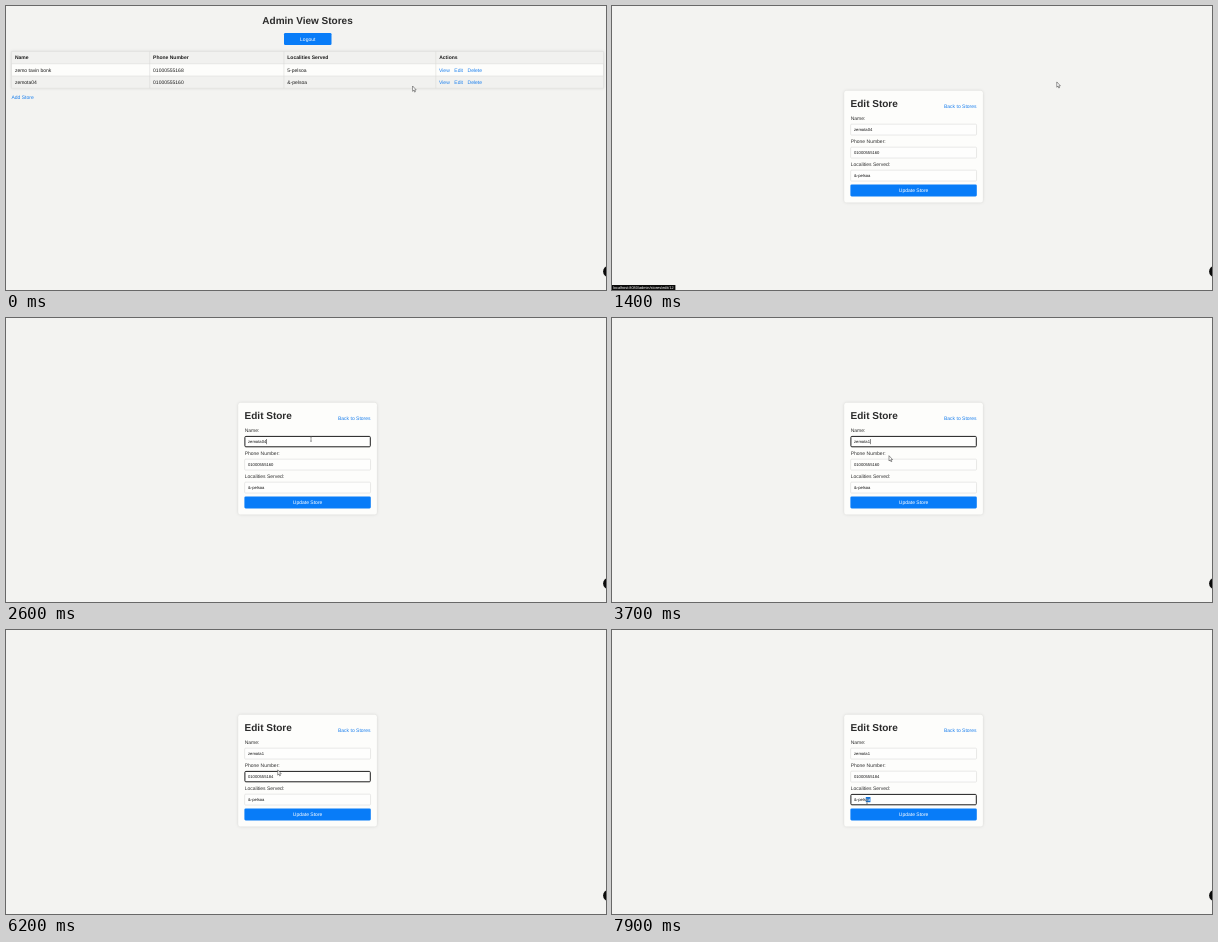
Animation of 600x284 px, one loop 8 s. Source, as an HTML page:

```html
<!DOCTYPE html>
<html lang="en">
<head>
<meta charset="utf-8">
<title>Admin stores</title>
<style>
  html, body { margin: 0; width: 100%; height: 100%; overflow: hidden; background: #f3f3f1; }
  svg { display: block; width: 600px; height: 284px; }
  text { font: 5px "Liberation Sans", Arial, sans-serif; fill: #333; text-rendering: geometricPrecision; white-space: pre; }
  .bold { font-weight: bold; fill: #1c1c1c; }
  .title { font-size: 10px; font-weight: bold; fill: #2b2b2b; }
  .link { fill: #1a7fee; }
  .cell { fill: #1c1c1c; }
  .value { font-size: 4.167px; fill: #111; }
  .white { fill: #fff; }
  .status { font-size: 3.87px; fill: #fff; }
  .mid { text-anchor: middle; }
  .hover { text-decoration: underline; }
  .card { filter: drop-shadow(0 0 1.5px rgba(0, 0, 0, .13)); }
  .arrow, .hand { fill: #fff; stroke: #333; stroke-width: .5; }
  .beam { fill: none; stroke: #555; stroke-width: .55; }
</style>
</head>
<body>
<svg id="stage" viewBox="0 0 600 284"></svg>
<script>
const stage = document.getElementById('stage');
const LOOP = 8000, STEP = 100, MOVE = 500;
const FORM = { x: 238.4, w: 126.4, top: 117.9, gap: 23, h: 11.4 };
const VALUE = 4.167, STATUS = 3.87;

const pen = document.createElement('canvas').getContext('2d');
pen.font = '100px "Liberation Sans", Arial, sans-serif';
const widthOf = (s, size) => pen.measureText(s).width * size / 100;

const rect = (x, y, w, h, fill, extra = '') =>
  `<rect x="${x}" y="${y}" width="${w}" height="${h}" fill="${fill}" ${extra}/>`;
const text = (x, y, s, cls = '') =>
  `<text x="${x}" y="${y}" class="${cls}">${s.replace(/&/g, '&amp;')}</text>`;
const button = (x, y, w, label, over) =>
  rect(x, y, w, 12, over ? '#0a57ad' : '#087cf8', 'rx="1.3"') + text(x + w / 2, y + 7.7, label, 'white mid');

// How many of `max` repeated actions have happened by time t
const count = (t, start, gap, max) =>
  Math.max(0, Math.min(max, Math.floor((t - start) / gap) + 1));

// Pointer stops: arrival time, x, y
const STOPS = [
  [0, 406.6, 80.3], [500, 468, 76], [900, 453, 76.6], [1800, 374, 73], [2400, 305, 121],
  [3400, 277, 138], [4200, 264, 162], [5000, 264.5, 148], [5600, 278.5, 162.5],
  [6400, 268, 128], [7100, 290.5, 178.8], [7500, 260, 171], [7900, 255, 172]
];

// The pointer rests at a stop, then glides to the next one in at most MOVE ms
function pointerAt(t) {
  const i = STOPS.findIndex(s => s[0] > t);
  if (i < 0) return STOPS.at(-1).slice(1);
  const [t0, x0, y0] = STOPS[i - 1], [t1, x1, y1] = STOPS[i];
  const k = Math.max(0, 1 - (t1 - t) / Math.min(MOVE, t1 - t0));
  const e = k * k * (3 - 2 * k);
  return [x0 + (x1 - x0) * e, y0 + (y1 - y0) * e];
}

const SHAPES = {
  arrow: 'M0-.3V5L1.2 3.9 2 5.8 2.8 5.4 2 3.6H3.6Z',
  hand: 'M-.6 .5Q0-.5 .6 .5V3L3 3.5Q3.7 3.8 3.5 4.6L2.8 7.4H-.6L-2.5 4.6Q-2.3 3.7-.6 4.6Z',
  beam: 'M-1-2.2H1M0-2.2V2.2M-1 2.2H1'
};

const COLS = [5.5, 143.7, 277.9, 429.8];
const ROWS = [
  ['Name', 'Phone Number', 'Localities Served', 'Actions'],
  ['zemo tavin bonk', '01000555168', '5-pelsoa'],
  ['zemota04', '01000555160', '&-pelsoa']
];

let linkX = 433;
const LINKS = ['View', 'Edit', 'Delete'].map(label => {
  const x = linkX, w = widthOf(label, 5);
  linkX += w + 4.6;
  return { label, x, w };
});
const linkUnder = (x, y) => y > 73 && y < 79 ? LINKS.find(l => x >= l.x && x <= l.x + l.w) : null;

function storeList(over) {
  const [left, w, top, rowH] = [5.5, 592, 45.5, 12.25];
  const h = rowH * ROWS.length;
  let s = text(301.5, 18.4, 'Admin View Stores', 'title mid') + button(278, 27, 47.5, 'Logout');
  s += `<g class="card">${rect(left, top, w, h, '#fdfdfb')}</g>`;
  let grid = `M${left + w} ${top}v${h}M${left} ${top + h}h${w}`;
  for (const x of COLS) grid += `M${x} ${top}v${h}`;
  ROWS.forEach((row, r) => {
    const y = top + r * rowH;
    if (r !== 1) s += rect(left, y, w, rowH, '#f1f1ef');
    grid += `M${left} ${y}h${w}`;
    row.forEach((v, c) => s += text(COLS[c] + 3.4, y + 7.8, v, r ? 'cell' : 'bold'));
    if (r) for (const l of LINKS)
      s += text(l.x, y + 7.8, l.label, r === 2 && l === over ? 'link hover' : 'link');
  });
  s += `<path d="${grid}" fill="none" stroke="#d6d6d4" stroke-width=".5"/>`;
  return s + text(left, 93.2, 'Add Store', 'link');
}

function field({ label, value, focus, selected = 0, caret }, row) {
  const y = FORM.top + row * FORM.gap;
  const head = value.slice(0, value.length - selected), tail = value.slice(head.length);
  const from = 242 + widthOf(head, VALUE), end = 242 + widthOf(value, VALUE);
  const inset = focus ? .5 : .25;
  let s = text(238.7, y - 3.9, label);
  s += rect(FORM.x + inset, y + inset, FORM.w - 2 * inset, FORM.h - 2 * inset, '#fefefd',
    `rx="1" stroke="${focus ? '#1c1c1c' : '#d2d2d0'}" stroke-width="${2 * inset}"`);
  if (selected) s += rect(from, y + 3.1, end - from, 5.2, '#1470d0');
  s += text(242, y + 7.2, head, 'value') + text(from, y + 7.2, tail, 'value white');
  return caret ? s + rect(end, y + 3.1, .5, 5.2, '#111') : s;
}

function editForm(t, over) {
  const name = 'zemota04'.slice(0, 8 - count(t, 2900, 200, 2)) + (t < 3500 ? '' : '1');
  const phone = '010005551' + (t < 5400 ? '60' : '84'.slice(0, count(t, 5400, 100, 2)));
  const onName = t >= 2600 && t < 4400;
  const fields = [
    { label: 'Name:', value: name, focus: onName, caret: onName },
    { label: 'Phone Number:', value: phone, focus: t >= 4400 && t < 7500,
      selected: t < 5400 ? count(t, 4700, 300, 2) : 0 },
    { label: 'Localities Served:', value: '&-pelsoa', focus: t >= 7500,
      selected: count(t, 7700, 100, 2) }
  ];
  return `<g class="card">${rect(232.2, 84.8, 138.7, 111.6, '#fdfdfb', 'rx="2.5"')}</g>`
    + text(238.6, 100.8, 'Edit Store', 'title') + text(332, 102, 'Back to Stores', 'link')
    + fields.map(field).join('') + button(FORM.x, 178.4, FORM.w, 'Update Store', over);
}

function draw(t) {
  const [x, y] = pointerAt(t);
  const listing = t < 1000;
  const link = t < 1500 ? linkUnder(x, y) : null;
  const inForm = !listing && x > FORM.x && x < FORM.x + FORM.w;
  const onButton = inForm && y > 178.4 && y < 190.4;
  const onField = inForm && y > FORM.top && y < 176 && (y - FORM.top) % FORM.gap < FORM.h;
  const shape = link || onButton ? 'hand' : onField ? 'beam' : 'arrow';
  const action = link ? link.label : !listing && t < 1900 ? 'Edit' : '';

  let s = listing ? storeList(link) : editForm(t, onButton);
  s += '<circle cx="602.8" cy="265.5" r="5.7" fill="#0a0a0a"/>';
  if (action) {
    const url = `localhost:8080/admin/stores/${action.toLowerCase()}/12`;
    s += rect(0, 279, 2.5 + widthOf(url, STATUS), 5, '#0a0a0a') + text(1, 283, url, 'status');
  }
  stage.innerHTML = s + `<path class="${shape}" d="${SHAPES[shape]}" transform="translate(${x} ${y})"/>`;
}

let shown = -1;
function tick() {
  const t = Math.floor(performance.now() % LOOP / STEP) * STEP;
  if (t !== shown) draw(shown = t);
  requestAnimationFrame(tick);
}
tick();
</script>
</body>
</html>
```
